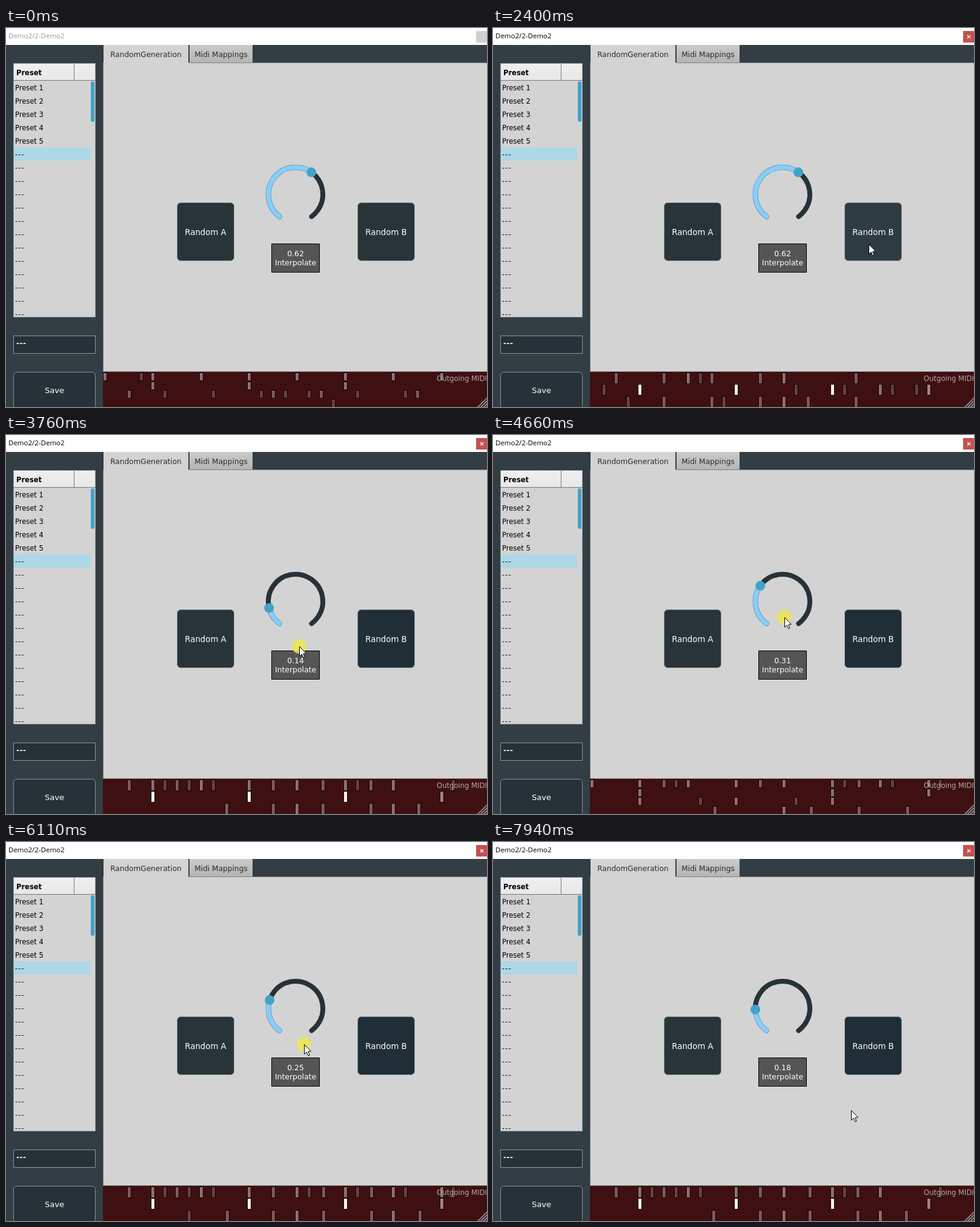
Recreate the animation shown at these times as an HTML page with a canvas. Size 794x626 px, loop 8000 ms.

```html
<!DOCTYPE html>
<html lang="en">
<head>
<meta charset="utf-8">
<title>Random generation</title>
<style>
html, body { margin: 0; width: 100%; height: 100%; overflow: hidden; background: #d3d3d3; }
canvas { display: block; }
</style>
</head>
<body>
<canvas id="stage" width="794" height="626"></canvas>
<script>
const ctx = document.getElementById('stage').getContext('2d');
const LOOP = 8000, STEP = 70, START = 250;
const PANEL = '#323e44', DARK = '#263238', GREY = '#d3d3d3', BLUE = '#42a2c8';
const SANS = '"DejaVu Sans", Verdana, sans-serif';

const CLICK_A = 1430, CLICK_B = 2520, GRAB = 3040, DROP = 6730;
const PRESSES = [[CLICK_A, 1580], [CLICK_B, 2670], [GRAB, DROP]];

// Pointer moves: depart, arrive, x, y
const MOVES = [
  [START, 600, 560, 268], [600, 1090, 390, 337], [1270, 1430, 338, 350],
  [1700, 2050, 470, 262], [2050, 2340, 620, 357], [2680, GRAB, 493, 241],
  [3060, 3750, 484, 349], [3760, 4450, 481, 301], [4730, 5270, 486, 205],
  [5270, 5880, 489, 245], [5880, 6060, 492, 334], [6130, 6560, 488.4, 346],
  [DROP, 6870, 572, 434], [6870, 7280, 591, 443]
];

// Each roll is a list of lanes, each lane the steps (of 32) that hold a note.
const every = (n, from, to = 31) =>
  Array.from({ length: Math.floor((to - from) / n) + 1 }, (_, i) => from + i * n);
const accents = every(8, 4);
const pulse = [5, 7, 9, 21, 29, ...every(2, 2, 8), ...every(2, 12, 24)];
const bass = [16, 24, ...every(4, 10, 26)];
const ROLLS = {
  idle: [[3, ...every(4, 0)], every(8, 4, 20), [2, 14, 15, 18, 26, ...every(4, 5, 25)], [19]],
  fresh: [[8, 9, 16, 22, ...every(4, 2, 14)], [1, 17, 21, 24, 25, 27, ...accents],
    [3, 11, 16, ...every(4, 6, 22)]],
  low: [pulse, accents, bass],
  mid: [[17, 25, 28, ...pulse], accents, [7, ...bass]],
  high: [[7, 21, 25, 29, ...every(8, 6, 22), ...every(4, 0)], [4, 20, 28],
    [9, 17, ...every(8, 4, 20)], [10, 16, ...every(4, 18, 26)]]
};

function box(x, y, w, h, fill, line, r = 0) {
  ctx.beginPath();
  ctx.roundRect(x, y, w, h, r);
  ctx.fillStyle = fill;
  ctx.fill();
  if (line) {
    ctx.lineWidth = 1;
    ctx.strokeStyle = line;
    ctx.stroke();
  }
}

function text(str, x, y, size, color, { align = 'left', weight = '', font = SANS, gap = 0 } = {}) {
  ctx.font = `${weight} ${size}px ${font}`;
  ctx.textAlign = align;
  ctx.letterSpacing = gap + 'px';
  ctx.fillStyle = color;
  ctx.fillText(str, x, y);
  ctx.letterSpacing = '0px';
}

function vertical(y0, y1, top, bottom) {
  const g = ctx.createLinearGradient(0, y0, 0, y1);
  g.addColorStop(0, top);
  g.addColorStop(1, bottom);
  return g;
}

function line(x0, y0, x1, y1, color, width = 1) {
  ctx.beginPath();
  ctx.moveTo(x0, y0);
  ctx.lineTo(x1, y1);
  ctx.lineWidth = width;
  ctx.strokeStyle = color;
  ctx.stroke();
}

function disc(x, y, r, color) {
  ctx.beginPath();
  ctx.arc(x, y, r, 0, 7);
  ctx.fillStyle = color;
  ctx.fill();
}

function pointerAt(t) {
  let x = 711, y = 612;
  for (const [depart, arrive, toX, toY] of MOVES) {
    if (t <= depart) break;
    const p = Math.min(1, (t - depart) / (arrive - depart)), e = p * p * (3 - 2 * p);
    x += (toX - x) * e;
    y += (toY - y) * e;
  }
  return [x, y];
}

// The knob follows the drag to the right and upwards.
function valueAt(t) {
  const [x, y] = pointerAt(Math.max(GRAB, Math.min(DROP, t)));
  return .14 + .00394 * (349 - y) + .00637 * (x - 484);
}

function drawTitle(active) {
  box(0, 0, 794, 28, '#fff');
  text('Demo2/2-Demo2', 4, 17, 11.5, active ? '#000' : '#999', { font: '"Open Sans", sans-serif' });
  box(776, 5, 18, 19, active ? '#c75050' : '#cfcfcf');
  if (active) {
    line(783, 12, 788, 17, '#fff', 1.3);
    line(788, 12, 783, 17, '#fff', 1.3);
  }
}

function drawSidebar() {
  box(0, 28, 160, 598, PANEL);
  box(12.5, 58.5, 135, 419, GREY, '#8e989b');
  box(13, 59, 134, 27, vertical(59, 86, '#efefef', '#e8e8e8'));
  line(12, 86.5, 148, 86.5, '#777');
  line(112.5, 59, 112.5, 86, '#777');
  text('Preset', 17, 78, 11.5, '#000', { weight: 'bold' });

  ctx.save();
  ctx.beginPath();
  ctx.rect(13, 87, 134, 390);
  ctx.clip();
  box(13, 197, 126, 22, '#add8e6');
  for (let i = 0; i < 18; i++) {
    const y = 103 + i * 22;
    if (i < 5) text('Preset ' + (i + 1), 15, y, 11.5, '#000');
    else text('---', 15, y, 11.5, '#000', { gap: 1.1 });
  }
  ctx.restore();
  box(140, 88, 6, 67, BLUE, null, 3);

  box(12.5, 508.5, 135, 29, DARK, '#8e989b');
  text('---', 17, 525, 12, '#fff', { weight: 'bold', gap: .5 });
  box(12.5, 568.5, 135, 60, DARK, '#8a9599', 5);
  text('Save', 80, 603, 13.1, '#fff', { align: 'center' });
}

function drawTabs() {
  box(160, 28, 634, 30, PANEL);
  box(160, 57, 634, 511, GREY);
  line(302, 57.5, 794, 57.5, '#808080');
  line(160.5, 57, 160.5, 568, '#808080');
  line(160, 567.5, 794, 567.5, '#808080');
  box(161, 28, 140, 30, GREY);
  box(303, 28, 104, 29, vertical(28, 57, '#cbcbcb', '#b4b4b4'));
  text('RandomGeneration', 231, 48, 12.1, '#2b2b2b', { align: 'center' });
  text('Midi Mappings', 355, 48, 12.2, '#2b2b2b', { align: 'center' });
}

function drawButton(label, x, fill) {
  box(x + .5, 288.5, 94, 96, fill, '#949a9c', 6);
  text(label, x + 47.5, 342, 13.3, '#fff', { align: 'center' });
}

function drawKnob(value) {
  const cx = 478, cy = 275, r = 45;
  const angle = v => (-144 + 288 * v - 90) * Math.PI / 180;
  const arc = (v, color, width) => {
    ctx.beginPath();
    ctx.arc(cx, cy, r, angle(0), angle(v));
    ctx.lineWidth = width;
    ctx.strokeStyle = color;
    ctx.stroke();
  };
  ctx.lineCap = 'round';
  arc(1, DARK, 8);
  arc(value, '#5d93b4', 8.6);
  arc(value, '#87cefa', 7.4);
  ctx.lineCap = 'butt';
  const a = angle(value);
  disc(cx + r * Math.cos(a), cy + r * Math.sin(a), 8, BLUE);

  box(438.5, 356.5, 79, 47, '#555', '#000');
  text(value.toFixed(2), 478, 377, 12.4, '#fff', { align: 'center' });
  text('Interpolate', 478, 392, 12.4, '#fff', { align: 'center' });
}

function drawNote(x, y, h, light) {
  box(x, y, 7, h, '#0c0304');
  const g = ctx.createLinearGradient(x + 1, 0, x + 6, 0);
  g.addColorStop(0, `rgba(255,240,240,${light})`);
  g.addColorStop(1, `rgba(255,240,240,${light === 1 ? 1 : light * .8})`);
  box(x + 1, y + 1, 5, h - 2, '#431416');
  box(x + 1, y + 1, 5, h - 2, g);
}

function drawRoll(lanes, swing) {
  box(160, 568, 634, 58, '#3f1012');
  const pitch = 58.4 / lanes.length;
  lanes.forEach((steps, i) => {
    const accented = lanes.length === 3 && i === 1;
    for (const k of steps) {
      const accent = accented && k % 8 === 4;
      const light = accent ? (k < 28 ? 1 : .55) : k % 4 === 0 ? .45 : k % 2 ? .22 : .35;
      const late = k % 4 === 2 && k > 8 && k !== 14 ? swing : 0;
      drawNote(Math.round(160 + k * 19.84 + late), Math.round(569 + i * pitch), Math.floor(pitch), light);
    }
  });
  text('Outgoing MIDI', 711, 583, 11.6, '#b5a8a9');
  for (let d = 16; d > 0; d -= 4.8) {
    line(794 - d, 627, 795, 626 - d, '#d3d3d3', 1.2);
    line(795.2 - d, 627, 795, 627.2 - d, '#555', 1.2);
  }
}

function drawPointer(x, y, pressed) {
  if (pressed) disc(x, y, 12, 'rgba(236,230,84,.88)');
  ctx.save();
  ctx.translate(Math.round(x) + .5, Math.round(y) + .5);
  ctx.beginPath();
  [[0, 0], [0, 16], [3.7, 12.6], [6.3, 18.4], [8.6, 17.4], [6.2, 11.7], [11, 11.3]]
    .forEach(p => ctx.lineTo(...p));
  ctx.closePath();
  ctx.fillStyle = '#fff';
  ctx.fill();
  ctx.lineWidth = 1;
  ctx.strokeStyle = '#000';
  ctx.stroke();
  ctx.restore();
}

function rollAt(t, value) {
  if (t < CLICK_A) return ROLLS.idle;
  if (t < CLICK_B || value >= .5) return ROLLS.fresh;
  return value < .2 ? ROLLS.low : value < .28 ? ROLLS.mid : ROLLS.high;
}

function draw(now) {
  const raw = now % LOOP;
  const t = raw < START ? 0 : START + Math.floor((raw - START) / STEP) * STEP;
  const [x, y] = pointerAt(t);
  const value = valueAt(t);
  const shown = t >= START;
  const pressed = PRESSES.some(([from, to]) => t >= from && t < to);
  const over = left => shown && x >= left && x < left + 95 && y > 288 && y < 385;

  drawTitle(t >= CLICK_A);
  drawSidebar();
  drawTabs();
  drawButton('Random A', 282, over(282) ? '#2d3b43' : '#283437');
  drawButton('Random B', 580, t >= CLICK_B ? '#202e38' : over(580) ? '#2d3b43' : '#283437');
  drawKnob(value);
  drawRoll(rollAt(t, value), t < CLICK_B ? 0 : Math.min(5, 14 * value + .5));
  if (shown) drawPointer(x, y, pressed);
}

const begin = performance.now();
function tick() {
  draw(performance.now() - begin);
  requestAnimationFrame(tick);
}
tick();
</script>
</body>
</html>
```
